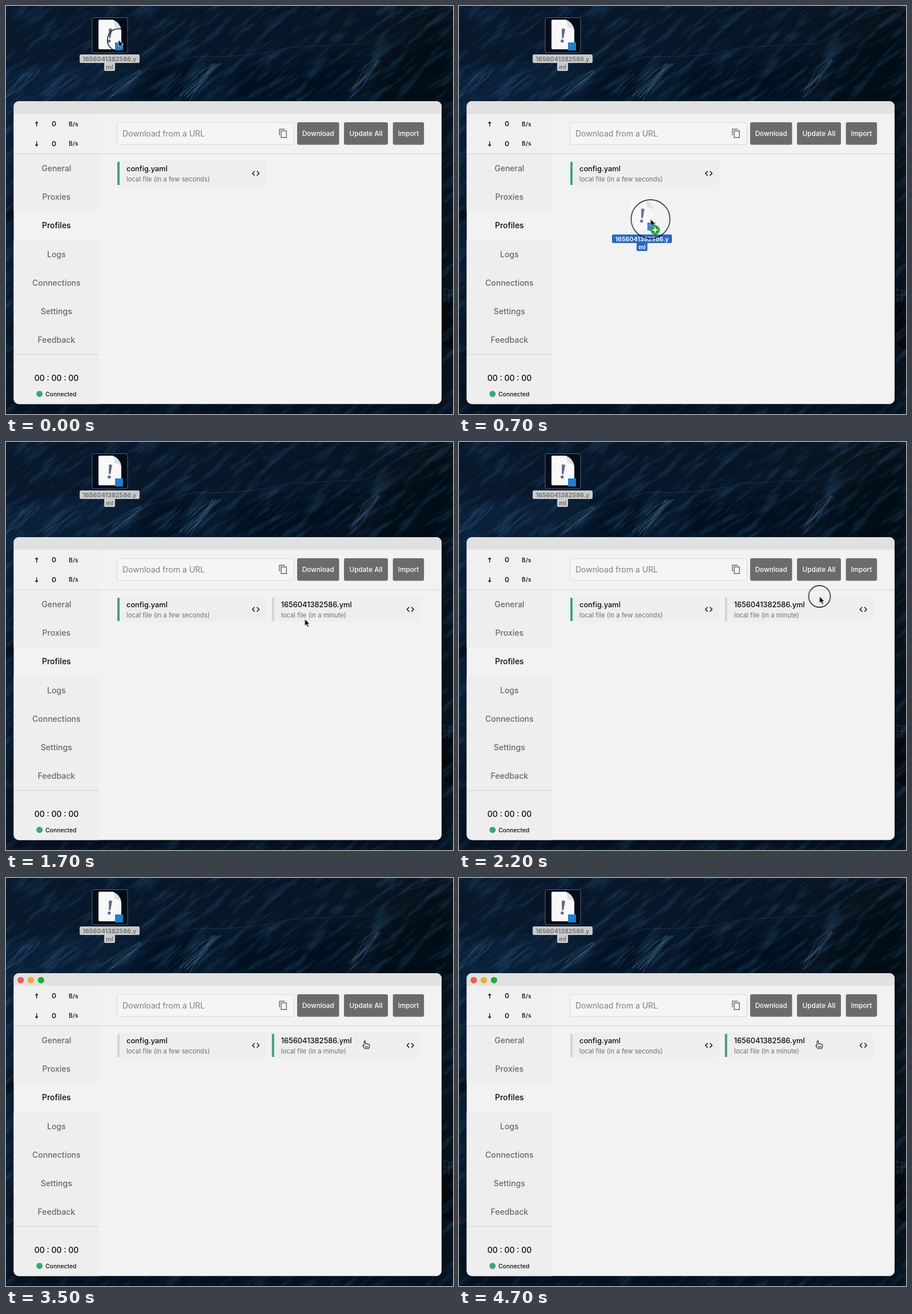
Recreate the animation shown at these times as an HTML page. Size 783x716 px, loop 4.8 s.

```html
<!DOCTYPE html>
<html lang="en">
<head>
<meta charset="utf-8">
<title>Drag a profile into the window</title>
<style>
  html, body { margin: 0; width: 100%; height: 100%; overflow: hidden; background: #06172b; }
  svg { display: block; width: 783px; height: 716px; font-family: Inter, "Noto Sans", sans-serif; }
  .nav { font-size: 14px; font-weight: 500; fill: #686868; text-anchor: middle; }
  .nav .on { fill: #0c0c0c; }
  .speed { font-size: 12px; font-weight: 600; fill: #1b1b1b; text-anchor: middle; }
  .unit { font-size: 10px; letter-spacing: .3px; }
  .button rect { fill: #6b6b6b; }
  .button text { font-size: 11.7px; font-weight: 500; fill: #fff; text-anchor: middle; }
  .name { font-size: 12.8px; font-weight: 500; fill: #0c0c0c; }
  .note { font-size: 11.3px; fill: #707070; }
  .line { stroke: #d2d2d2; }
  .label rect { fill: var(--box); }
  .label text { font-size: 10.8px; font-weight: 600; fill: var(--ink); text-anchor: middle; }
  .desk { --box: #c9cacb; --ink: #6b6e70; }
  .drag { --box: #1459bd; --ink: #fff; }

  .anim { animation: 4800ms step-end infinite; }
  #pointer { animation-name: travel; }
  #ring { animation-name: click; }
  #ghost { animation-name: ghost; }
  #plus { animation-name: plus; }
  #arrow { animation-name: arrow; }
  #hand { animation-name: hand; }
  #lights { animation-name: lights; }
  #added { animation-name: added; }
  #bar1 { animation-name: deselect; }
  #bar2 { animation-name: select; }

  /* the pointer advances ten times a second */
  @keyframes travel {
    0% { transform: translate(197px, 59.5px); }
    2.083% { transform: translate(197px, 59.5px); animation-timing-function: steps(2, end); }
    6.249% { transform: translate(228px, 130px); animation-timing-function: steps(2, end); }
    10.416% { transform: translate(314px, 326px); animation-timing-function: steps(2, end); }
    14.583% { transform: translate(335.5px, 374px); }
    16.666% { transform: translate(336.5px, 377.5px); }
    27.083% { transform: translate(336.5px, 377.5px); animation-timing-function: steps(2, end); }
    31.249% { transform: translate(390px, 360px); animation-timing-function: steps(3, end); }
    37.499% { transform: translate(590px, 286px); animation-timing-function: steps(2, end); }
    41.666% { transform: translate(631.5px, 271px); }
    60.416% { transform: translate(631.5px, 271px); animation-timing-function: steps(2, end); }
    64.583%, 100% { transform: translate(631px, 287px); }
  }
  @keyframes click {
    0% { r: 19.5px; opacity: 1; }
    14.583% { r: 34px; opacity: 1; }
    16.666% { r: 19px; opacity: 0; }
    45.833% { r: 19px; opacity: 1; }
    47.916% { r: 34px; opacity: 1; }
    49.999% { r: 19px; opacity: 0; }
    66.666% { r: 19px; opacity: 1; }
    68.749% { r: 34px; opacity: 1; }
    70.833%, 100% { r: 19px; opacity: 0; }
  }
  @keyframes ghost { 0% { opacity: 0; } 4.166% { opacity: .9; } 16.666%, 100% { opacity: 0; } }
  @keyframes plus { 0% { opacity: 0; } 8.333% { opacity: 1; } 16.666%, 100% { opacity: 0; } }
  @keyframes arrow { 0% { opacity: 1; } 64.583%, 100% { opacity: 0; } }
  @keyframes hand { 0% { opacity: 0; } 64.583%, 100% { opacity: 1; } }
  @keyframes lights { 0% { opacity: 0; } 47.916%, 100% { opacity: 1; } }
  @keyframes added { 0% { opacity: 0; } 18.749%, 100% { opacity: 1; } }
  @keyframes deselect { 0% { fill: #3fa37a; } 68.749%, 100% { fill: #d3d3d3; } }
  @keyframes select { 0% { fill: #d3d3d3; } 68.749%, 100% { fill: #3fa37a; } }
</style>
</head>
<body>
<svg viewBox="0 0 783 716">
  <defs>
    <linearGradient id="night" x2="1">
      <stop offset="0" stop-color="#08192e"/>
      <stop offset=".6" stop-color="#071627"/>
      <stop offset="1" stop-color="#08131f"/>
    </linearGradient>
    <linearGradient id="slope" x2="1">
      <stop offset="0" stop-color="#0a2039"/>
      <stop offset=".5" stop-color="#081a2d"/>
      <stop offset=".8" stop-color="#081624"/>
      <stop offset="1" stop-color="#070f17"/>
    </linearGradient>
    <linearGradient id="edge" x2="0" y2="1">
      <stop offset="0" stop-color="#0a2340"/>
      <stop offset=".3" stop-color="#0a203a"/>
      <stop offset=".36" stop-color="#05111f"/>
      <stop offset=".42" stop-color="#0a233e"/>
      <stop offset=".65" stop-color="#081b30"/>
      <stop offset="1" stop-color="#061424"/>
    </linearGradient>
    <filter id="soft"><feGaussianBlur stdDeviation=".7"/></filter>
    <filter id="haze" x="-20%" y="-20%" width="140%" height="140%"><feGaussianBlur stdDeviation="9"/></filter>
    <filter id="grain" x="0" y="0" width="100%" height="100%" color-interpolation-filters="sRGB">
      <feTurbulence type="fractalNoise" baseFrequency=".018 .09" numOctaves="4" seed="7"/>
      <feColorMatrix values="0 0 0 0 .16  0 0 0 0 .33  0 0 0 0 .47  2.6 0 0 0 -1.25"/>
    </filter>
    <clipPath id="frame"><rect x="13.5" y="167" width="749.5" height="531.5" rx="9"/></clipPath>

    <g id="file">
      <path d="M164 24H187Q200 29 202 43V74Q202 76 200 76H164Q162 76 162 74V26Q162 24 164 24Z" fill="#f8f8f8"/>
      <path d="M187 24Q191 31 190 37 198 37 202 43 200 29 187 24Z" fill="#dcdde0"/>
      <path d="M180.2 39.5L186 40 183 56.5H180.2Z" fill="#66648f"/>
      <circle cx="180.8" cy="61.5" r="2.7" fill="#66648f"/>
      <rect x="191" y="64" width="14" height="14" fill="#1f7ed0"/>
      <g class="label">
        <rect x="129" y="85" width="105" height="15" rx="2.5"/>
        <rect x="172" y="98" width="19" height="16" rx="2.5"/>
        <text x="181.5" y="96.5">1656041382586.y</text>
        <text x="181.5" y="110.5">ml</text>
      </g>
    </g>
    <path id="code" d="M435.5 289.8L431.7 293.7 435.5 297.6M439.5 289.8L443.3 293.7 439.5 297.6" fill="none" stroke="#222" stroke-width="1.6"/>
  </defs>

  <rect width="783" height="716" fill="url(#night)"/>
  <path d="M0 118Q90 92 180 94L243 112 330 88Q420 92 500 72L630 66 700 22 783 0V180H0Z" fill="url(#slope)"/>
  <path d="M250 112Q330 86 375 108L310 168H215ZM400 104Q520 84 640 98L590 168H390Z" fill="#05101c" opacity=".7" filter="url(#haze)"/>
  <path d="M640 170Q668 80 730 62L783 30V180H640Z" fill="#060c12" opacity=".8" filter="url(#haze)"/>
  <rect y="167" width="14" height="549" fill="url(#edge)"/>
  <path d="M762 167H783V716H762Z" fill="#09131e"/>
  <path d="M762 520H783V606L762 590Z" fill="#050a10"/>
  <path d="M763 496L783 500M763 507H783M768 497V518M776 499V520" stroke="#3b4854" opacity=".7"/>
  <rect y="697" width="783" height="19" fill="#061424"/>
  <rect x="-500" y="-300" width="1500" height="1400" filter="url(#grain)" opacity=".45" transform="rotate(-38)"/>
  <g id="rocks" fill="none" filter="url(#soft)"></g>
  <rect x="12" y="172" width="752" height="532" rx="11" opacity=".4" filter="url(#haze)"/>

  <rect x="151" y="20.5" width="62" height="61.5" rx="3" fill="#020913" fill-opacity=".8" stroke="#56636f"/>
  <use href="#file" class="desk"/>

  <g clip-path="url(#frame)">
    <rect x="13" y="167" width="751" height="532" fill="#f2f2f2"/>
    <rect x="13" y="167" width="751" height="22" fill="#e1e1e1"/>
    <path d="M13 189H163V259H13Z" fill="#f0f0f0"/>
    <path d="M13 260H163V355Q163 360 158 360H13ZM13 410H158Q163 410 163 415V699H13Z" fill="#eee"/>
    <path class="line" d="M13 259.5H764M13 611.5H163.5"/>
  </g>
  <g id="lights" class="anim">
    <circle cx="25.8" cy="179.3" r="5.6" fill="#ed5a50"/>
    <circle cx="43.5" cy="179.3" r="5.6" fill="#f1aa2c"/>
    <circle cx="61.3" cy="179.3" r="5.6" fill="#25a93a"/>
  </g>

  <g class="speed">
    <path d="M53.7 211.5V203.5M51.4 206L53.7 203.3 56 206M53.7 237.5V245.5M51.4 243L53.7 245.7 56 243" fill="none" stroke="#1b1b1b" stroke-width="1.3"/>
    <text x="84" y="210.7">0</text><text class="unit" x="118.5" y="210.5">B/s</text>
    <text x="84" y="245.5">0</text><text class="unit" x="118.5" y="245.3">B/s</text>
  </g>
  <g class="nav">
    <text x="88.3" y="289.7">General</text>
    <text x="88.3" y="340">Proxies</text>
    <text x="88.3" y="390.2" class="on">Profiles</text>
    <text x="88.3" y="440.5">Logs</text>
    <text x="88.3" y="490.7">Connections</text>
    <text x="88.3" y="541">Settings</text>
    <text x="88.3" y="591.3">Feedback</text>
    <text x="88.5" y="657.7" class="on">00 : 00 : 00</text>
  </g>
  <circle cx="58.7" cy="680.7" r="5.5" fill="#3fa578"/>
  <text x="69" y="684.7" font-size="10.4" font-weight="500" fill="#111">Connected</text>

  <rect x="194.5" y="204.5" width="310" height="38.5" rx="3" fill="#f5f5f5" stroke="#d6d6d6"/>
  <text x="204" y="229.2" font-size="14" fill="#808080">Download from a URL</text>
  <path d="M479 227V216.3H488.5M482 219.3H491.3V230.8H482Z" fill="none" stroke="#666" stroke-width="1.4"/>
  <g class="button">
    <rect x="510" y="204" width="73.5" height="39.5" rx="3"/><text x="546.7" y="228.3">Download</text>
    <rect x="592" y="204" width="77" height="39.5" rx="3"/><text x="630.5" y="228.3">Update All</text>
    <rect x="677.7" y="204" width="54.5" height="39.5" rx="3"/><text x="705" y="228.3">Import</text>
  </g>

  <g>
    <rect x="195" y="271.5" width="260.5" height="44" rx="3" fill="#eee"/>
    <rect id="bar1" class="anim" x="195" y="273.5" width="4" height="40.5"/>
    <text class="name" x="211" y="290">config.yaml</text>
    <text class="note" x="211" y="308">local file (in a few seconds)</text>
    <use href="#code"/>
  </g>
  <g id="added" class="anim">
    <rect x="465.7" y="271.5" width="260.5" height="44" rx="3" fill="#eee"/>
    <rect id="bar2" class="anim" x="465.7" y="273.5" width="4" height="40.5"/>
    <text class="name" x="481.7" y="290">1656041382586.yml</text>
    <text class="note" x="481.7" y="308">local file (in a minute)</text>
    <use href="#code" x="270.7"/>
  </g>

  <g id="pointer" class="anim">
    <g id="ghost" class="anim"><use href="#file" class="drag" x="-196.5" y="-58"/></g>
    <g id="plus" class="anim">
      <circle cx="8" cy="19" r="8.3" fill="#2f9f3a"/>
      <path d="M3.5 19H12.5M8 14.5V23.5" stroke="#fff" stroke-width="2"/>
    </g>
    <path id="arrow" class="anim" d="M0 0V12L2.8 9.4 4.8 14 7 13 5 8.6H8.7Z" fill="#111" stroke="#fff" stroke-width=".7"/>
    <path id="hand" class="anim" d="M-3.7 6.5V0Q-3.7-1.4-2.5-1.4T-1.3 0V4.2Q-.3 3 .8 4.4 2 3.4 3 4.9 5.8 4 5.8 7.2 5.8 10.5 4.2 12.5H-2.4L-6 7.6Q-5.8 5.8-3.7 7.6M.8 8V11M3 8V11M-1.3 8V11" fill="#fff" stroke="#222" stroke-width="1.2" stroke-linejoin="round"/>
    <circle id="ring" class="anim" r="20" fill="none" stroke="#111" stroke-width="1.4"/>
  </g>
</svg>
<script>
  let seed = 41;
  const rand = () => (seed = seed * 16807 % 2147483647) / 2147483647;
  const jitter = size => (rand() - .5) * size;

  // Moonlit gullies: x and y at the top, run and drop, spread, count, brightness
  const gullies = [
    [370, 102, -60, 58, 16, 9, .34], [243, 114, -56, 40, 18, 8, .28],
    [655, 94, -52, 58, 14, 8, .32], [45, 114, -42, 42, 30, 8, .24],
    [125, 116, -60, 44, 50, 9, .16], [330, 112, -40, 45, 50, 8, .14],
    [530, 92, -60, 45, 80, 8, .1], [300, 30, -60, 40, 160, 8, .06]
  ];
  const streak = (d, alpha, width) =>
    `<path d="${d}" stroke="#5c8fb2" stroke-opacity="${alpha}" stroke-width="${width}"/>`;

  let art = streak("M243 112L330 88Q420 92 500 72L630 66 700 22 783 0", .2, 1.2);
  for (const [x, y, run, drop, spread, count, light] of gullies) {
    for (let i = 0; i < count; i++) {
      const bend = () => `${run / 3 + jitter(14)} ${drop / 3 + jitter(9)}`;
      art += streak(`M${x + jitter(spread)} ${y + jitter(spread / 3)}l${bend()} ${bend()} ${bend()}`,
        light * (.4 + rand() * .6), .8 + rand() * 1.8);
    }
  }
  document.getElementById("rocks").innerHTML = art;
</script>
</body>
</html>
```
